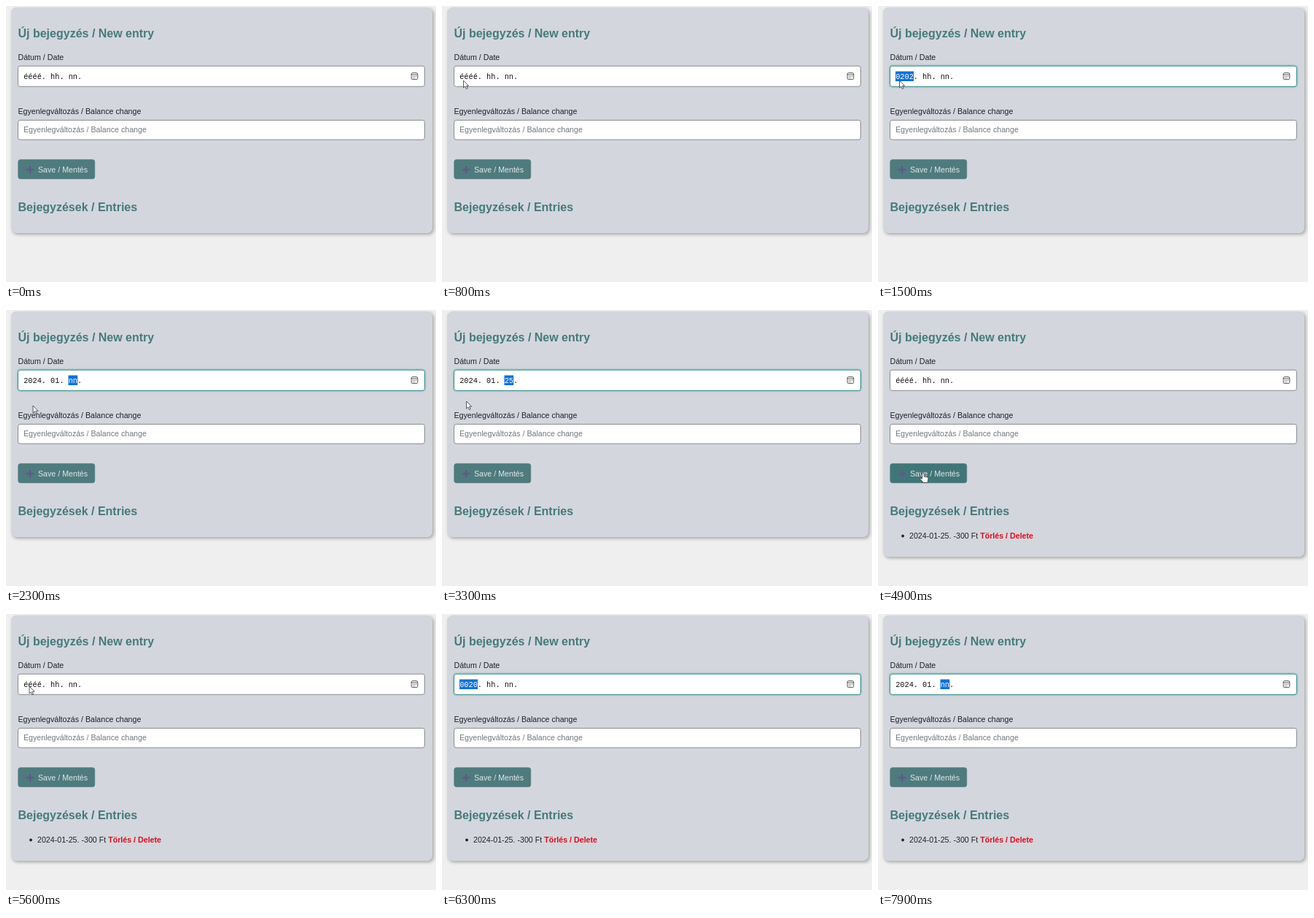
These frames come from a looping animation (590 by 378 pixels, 8 s). An HTML page:

```html
<!DOCTYPE html>
<html lang="hu">
<head>
<meta charset="utf-8">
<title>New entry</title>
<style>
html, body { margin: 0; width: 100%; height: 100%; overflow: hidden; background: #efefef; }
svg { display: block; font: 10.67px "Liberation Sans", Arial, sans-serif; fill: #202428; }
.panel { fill: #d3d6dd; filter: drop-shadow(2px 2px 2px rgba(0, 0, 0, .3)); }
.title { font-size: 16px; font-weight: bold; fill: #477a7c; }
.field { fill: #fff; stroke: #7d8186; stroke-width: .9; }
.field.focus { stroke: #2b8585; filter: drop-shadow(0 0 1.5px rgba(43, 133, 133, .6)); }
.button { fill: #4f7b7e; stroke: #467578; stroke-width: .7; }
.button.hover { fill: #417679; }
.date { font: 10.25px "Liberation Mono", monospace; fill: #111; }
.icon { fill: none; stroke: #444; stroke-width: .9; }
.pointer path { fill: #fff; stroke: #333; stroke-width: .8; stroke-linejoin: round; }
</style>
</head>
<body>
<svg width="590" height="378" viewBox="0 0 590 378">
  <rect id="panel" class="panel" x="7" y="2" width="578" height="309" rx="7"/>
  <text class="title" x="16.5" y="42.8">Új bejegyzés / New entry</text>
  <text x="16.5" y="74">Dátum / Date</text>
  <rect id="dateField" class="field" x="16.5" y="82.2" width="558" height="28.1" rx="3"/>
  <rect id="selection" y="89.5" height="13.5" fill="#1172d3"/>
  <text class="date" x="24.2" y="100.3"><tspan id="before"></tspan><tspan id="picked" fill="#fff"></tspan><tspan id="after"></tspan></text>
  <g class="icon">
    <rect x="556.2" y="91.6" width="8.6" height="9" rx="1.5"/>
    <path d="M556.2 94h8.6"/>
    <path d="M558 96.4h5.4M558 98.6h3.4" stroke-dasharray="1.2 1"/>
  </g>
  <text x="16.5" y="148.2">Egyenlegváltozás / Balance change</text>
  <rect id="amountField" class="field" x="16.5" y="156.4" width="558" height="26.7" rx="3"/>
  <text id="amount" x="24" y="173.2"></text>
  <path id="caret" d="M0 164v12" stroke="#111"/>
  <path id="spinner" d="M559.5 168.5l2.5-3 2.5 3zM559.5 171.5l2.5 3 2.5-3z" fill="#666"/>
  <rect id="button" class="button" x="16.8" y="210.4" width="104.9" height="26.3" rx="3"/>
  <path d="M28 224.3h10M33 219.5v9.6" stroke="#625689" stroke-width="2.2"/>
  <text x="44" y="228" fill="#dfe6e8">Save / Mentés</text>
  <text class="title" x="16.5" y="281.2">Bejegyzések / Entries</text>
  <g id="entry">
    <circle cx="34" cy="309.5" r="1.9"/>
    <text x="43" y="312.8">2024-01-25. -300 Ft <tspan font-weight="bold" fill="#d90d1c">Törlés / Delete</tspan></text>
  </g>
  <g class="pointer">
    <path id="arrow" d="M0 0v10l2.3-2.1 1.6 3.6 1.7-.7-1.6-3.5h3.1z"/>
    <path id="beam" d="M-2.5-5q2 0 2.5 1 .5-1 2.5-1M0-4V4M-2.5 5q2 0 2.5-1 .5 1 2.5 1" style="fill:none"/>
    <path id="hand" d="M-1.5 0q1.5-1.5 2.5 0v4l5 1q1.3.5 1 2l-1 5.5h-5.5L-4 7.5q-.5-2 1-1.5l1.5 1.3z"/>
  </g>
</svg>
<script>
const LOOP = 8000, CHAR = 6.15, EMPTY = "éééé. hh. nn.";
const ui = Object.fromEntries([...document.querySelectorAll("[id]")].map(e => [e.id, e]));
const parts = { year: [0, 4], month: [6, 2], day: [10, 2] };

// Each step: start time, date text, selected part
const dateSteps = [
  [0, EMPTY], [900, EMPTY, "year"],
  [1100, "0002. hh. nn.", "year"], [1300, "0020. hh. nn.", "year"],
  [1500, "0202. hh. nn.", "year"], [1700, "2024. hh. nn.", "year"],
  [1800, "2024. hh. nn.", "month"], [2000, "2024. 00. nn.", "month"],
  [2200, "2024. 01. nn.", "day"], [2600, "2024. 01. 02.", "day"],
  [2800, "2024. 01. 25.", "day"], [3800, "2024. 01. 25."],
  [4700, EMPTY], [5700, EMPTY, "year"],
  [6200, "0002. hh. nn.", "year"], [6300, "0020. hh. nn.", "year"],
  [6600, "0202. hh. nn.", "year"], [6900, "2024. hh. nn.", "year"],
  [7100, "2024. hh. nn.", "month"], [7200, "2024. 00. nn.", "month"],
  [7300, "2024. 01. nn.", "day"]
];
const amountSteps = [[0, ""], [4000, "-"], [4100, "-3"], [4200, "-30"], [4300, "-300"], [4700, ""]];
const pointerPath = [
  [200, -8, 235], [600, 24, 130], [800, 29.5, 102], [1600, 29.5, 102], [1800, 36, 101],
  [2300, 37, 131], [2700, 33.5, 125], [3400, 33.5, 125], [3750, 56.5, 173.5],
  [4400, 56.5, 173.5], [4650, 62, 224], [5100, 62, 224], [5600, 32, 99], [6000, 32, 99]
];

const stepAt = (steps, t) => steps.findLast(s => s[0] <= t);
const show = (el, on) => el.style.display = on ? "" : "none";

function pointerAt(t) {
  const i = pointerPath.findIndex(p => p[0] > t);
  if (i < 1) return null;
  const [t0, x0, y0] = pointerPath[i - 1], [t1, x1, y1] = pointerPath[i];
  const k = (t - t0) / (t1 - t0), e = k * k * (3 - 2 * k);
  return [x0 + (x1 - x0) * e, y0 + (y1 - y0) * e];
}

function drawDate(t) {
  const [, text, part] = stepAt(dateSteps, t);
  const [from, length] = parts[part] || [0, 0];
  ui.before.textContent = text.slice(0, from);
  ui.picked.textContent = text.slice(from, from + length);
  ui.after.textContent = text.slice(from + length);
  ui.selection.setAttribute("x", 24 + from * CHAR);
  ui.selection.setAttribute("width", length * CHAR + .4);
  show(ui.selection, part);
  ui.dateField.classList.toggle("focus", !!part);
}

function drawAmount(t, hovered) {
  const value = stepAt(amountSteps, t)[1];
  const focused = t >= 3800 && t < 4700;
  ui.amount.textContent = value || "Egyenlegváltozás / Balance change";
  ui.amount.style.fill = value ? "" : "#73777c";
  ui.amountField.classList.toggle("focus", focused);
  show(ui.spinner, focused || hovered);
  show(ui.caret, focused);
  const x = value ? 24.5 + ui.amount.getComputedTextLength() : 24.5;
  ui.caret.setAttribute("transform", `translate(${x})`);
}

function drawPointer(spot, kind) {
  for (const name of ["arrow", "beam", "hand"]) {
    show(ui[name], spot && name === kind);
    if (spot) ui[name].setAttribute("transform", `translate(${spot})`);
  }
}

function draw(t) {
  const spot = pointerAt(t), y = spot ? spot[1] : 0;
  const onAmount = y > 156 && y < 184 && t > 3000;
  const onButton = y > 210 && y < 238 && t > 3000;
  const saved = t >= 4700;
  drawDate(t);
  drawAmount(t, onAmount);
  drawPointer(spot, onButton ? "hand" : onAmount ? "beam" : "arrow");
  ui.button.classList.toggle("hover", onButton);
  ui.panel.setAttribute("height", saved ? 336 : 309);
  show(ui.entry, saved);
}

function frame() {
  draw(performance.now() % LOOP);
  requestAnimationFrame(frame);
}
frame();
</script>
</body>
</html>
```
